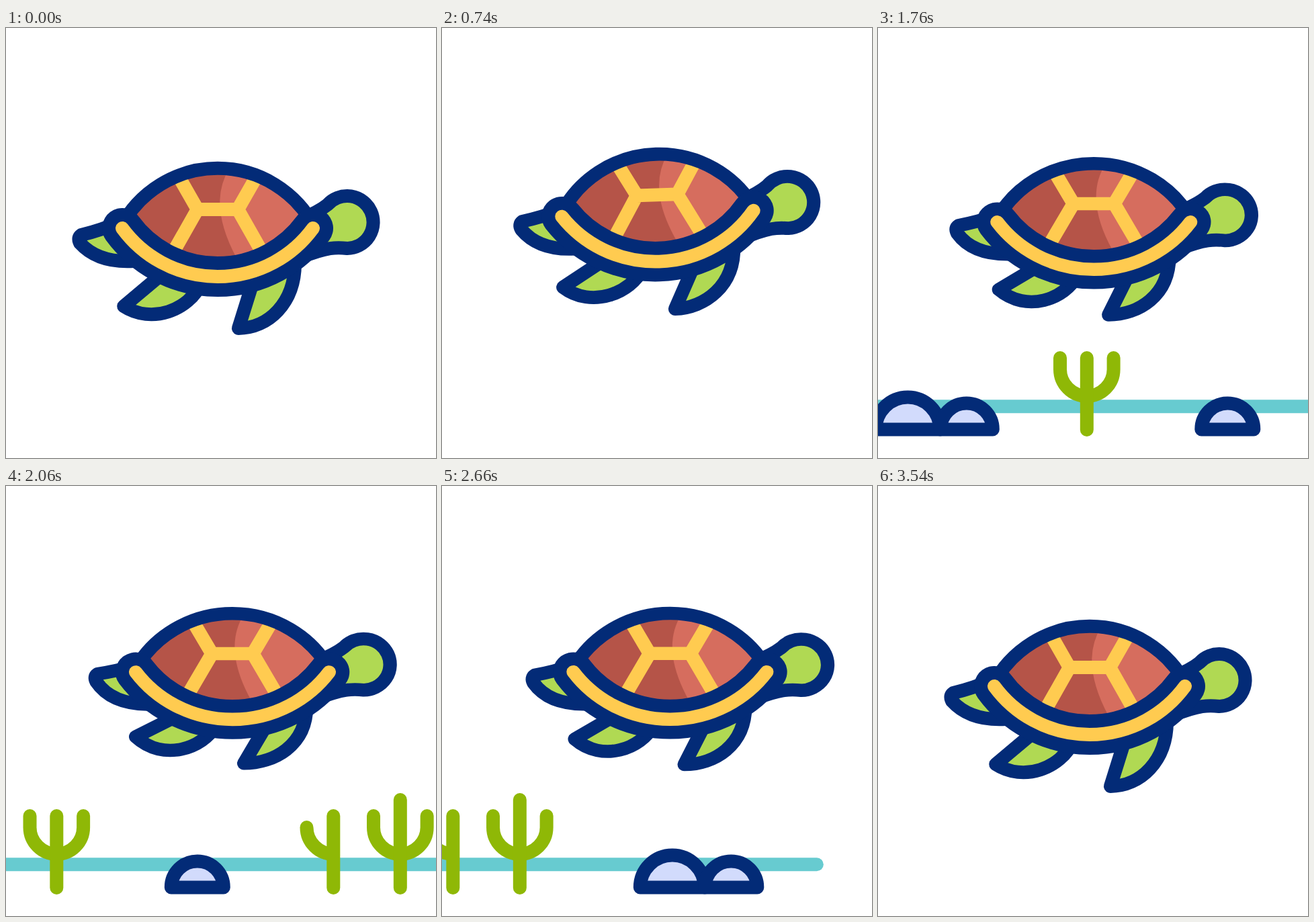
Animation of 640 by 640 pixels, one loop 3.6 s. Source, as an HTML page:

```html
<!DOCTYPE html>
<html lang="en">
<head>
<meta charset="utf-8">
<title>Swimming turtle</title>
<style>
  html, body { margin: 0; width: 100%; height: 100%; overflow: hidden; background: #fff; }
  svg { display: block; width: 100vw; height: 100vh; }
  path { stroke-width: 20; stroke-linejoin: round; stroke-linecap: round; fill: none; }
  .ink { stroke: #032b77; }
  .skin { stroke: #032b77; fill: #b0d953; }
  .rock { stroke: #032b77; fill: #d2dbfc; }
  .plant { stroke: #8fb806; }
  .gold { stroke: #ffcb50; }
  .water { stroke: #67cbd0; }
  .shade { fill: #b55448; }
  .light { fill: #d66d5e; }
  .plates { stroke-linejoin: miter; stroke-linecap: butt; }
  .rim { stroke-width: 60; }
</style>
</head>
<body>
<svg viewBox="0 0 640 640">
  <defs>
    <path id="dome" class="rock" d="M-39 597.500a39 39 0 0 1 78 0z"/>
    <g id="rocks">
      <path class="rock" d="M-48 597.500a48 48 0 0 1 96 0z"/>
      <use href="#dome" x="87.5"/>
    </g>
    <path id="arms" class="plant" d="M-39.8 491V508a39.8 39.8 0 0 0 79.6 0V491"/>
    <clipPath id="lens"><path d="M170 298A162.5 162.5 0 0 1 460 298A176 176 0 0 1 170 298z"/></clipPath>
  </defs>

  <g id="ground">
    <path class="water" d="M350 563.300H1689"/>
    <use href="#rocks" x="469"/>
    <use href="#arms" x="735.5"/>
    <path class="plant" d="M735.5 491V598"/>
    <use href="#dome" x="945"/>
    <path class="plant" d="M1147.5 491V598M1107.7 508a39.8 39.8 0 0 0 39.8 39.8"/>
    <use href="#arms" x="1247"/>
    <path class="plant" d="M1247 467V598"/>
    <use href="#rocks" x="1474"/>
  </g>

  <g id="turtle">
    <path id="tail" class="skin"/>
    <path id="rear" class="skin"/>
    <path id="front" class="skin"/>
    <path id="head" class="skin" d="M440 284Q466 273 478.5 263A39 39 0 1 1 508 328C492 326 478 326 440 341"/>
    <g clip-path="url(#lens)">
      <path class="shade" d="M150 190H480V390H150z"/>
      <path class="light" d="M332 210Q300 262 343 342H480V210z"/>
      <path class="gold plates" d="M257 221L285 270L247 337M373 221L345 270L383 337M285 270H345"/>
    </g>
    <path class="ink" d="M170 298A162.5 162.5 0 0 1 460 298"/>
    <path class="ink rim" d="M173 298A176 176 0 0 0 457 298"/>
    <path class="gold" d="M173 298A176 176 0 0 0 457 298"/>
  </g>
</svg>
<script>
const LOOP = 3600, SPEED = 0.785, SCROLL_AT = 1220, SWING = 24;
const $ = id => document.getElementById(id);

// Cosine glide between a few turning points [time, value]
const glide = (...points) => t => {
  const i = points.findIndex(p => p[0] > t);
  if (i < 1) return points[i < 0 ? points.length - 1 : 0][1];
  const [t0, a] = points[i - 1], [t1, b] = points[i];
  return a + (b - a) * (1 - Math.cos(Math.PI * (t - t0) / (t1 - t0))) / 2;
};

// Crouch, leap, sink, rise again, settle
const driftX = glide([100, 0], [520, -48], [880, 32], [1500, 0], [2380, 31], [3300, 0]);
const driftY = glide([100, 0], [440, 33], [920, -46], [1440, -3], [2430, -29], [3100, 0]);
const tilt = glide([200, 0], [580, -3], [950, 0]);
const pace = glide([560, 0], [1000, 1], [2800, 1], [3340, 0]);
// Flipper stroke: below 0 reaches forward, above 0 sweeps back
const stroke = glide([100, 0], [400, -.6], [760, .33], [1220, -1], [1760, .35], [2360, .68], [3000, 0]);

const polar = (x, y, r, deg) => {
  const a = deg * Math.PI / 180;
  return [x + r * Math.cos(a), y + r * Math.sin(a)];
};

function tailPath(k, p) {
  const d = -14 * k, x = 108 + 3 * p + 4 * k, y = 315 + d;
  return `M165 290Q145 ${300 + d / 2} ${x + 4} ${y - 7}Q${x - 2} ${y - 3} ${x + 2} ${y + 5}Q137 ${350 + d / 2} 190 347`;
}

function rearPath(k, p) {
  const [x, y] = polar(235, 364, 78 - 8 * p, 140 + SWING * k);
  const dx = x - 175, dy = y - 414;
  return `M${235 - dx / 5} 364L${x} ${y}C${x + 41} ${441 + dy * .3} ${273 + dx * .3} ${420 + dy * .4} 290 380`;
}

function frontPath(k, p) {
  const [x, y] = polar(368, 370, 80 - 4 * p, 106 + SWING * k);
  const end = 430 - 12 * Math.max(0, k), reach = Math.max(0, -k);
  return `M${370 - 6 * reach} 370L${x} ${y}C${x + 44 - 9 * reach} ${y} ${end} ${410 + 9 * reach} ${end} 350`;
}

function draw(t) {
  const k = stroke(t), p = pace(t), squash = .022 * p;
  $('ground').setAttribute('transform', `translate(${-SPEED * (t - SCROLL_AT)} 0)`);
  $('turtle').setAttribute('transform',
    `translate(${315 + driftX(t)} ${299 + driftY(t)}) rotate(${tilt(t)}) scale(${1 + squash * .6} ${1 - squash}) translate(-315 -299)`);
  $('head').setAttribute('transform', `translate(0 ${-5 * Math.max(0, k)})`);
  $('tail').setAttribute('d', tailPath(k, p));
  $('rear').setAttribute('d', rearPath(k, p));
  $('front').setAttribute('d', frontPath(k, p));
}

function tick() {
  draw(performance.now() % LOOP);
  requestAnimationFrame(tick);
}
tick();
</script>
</body>
</html>
```
